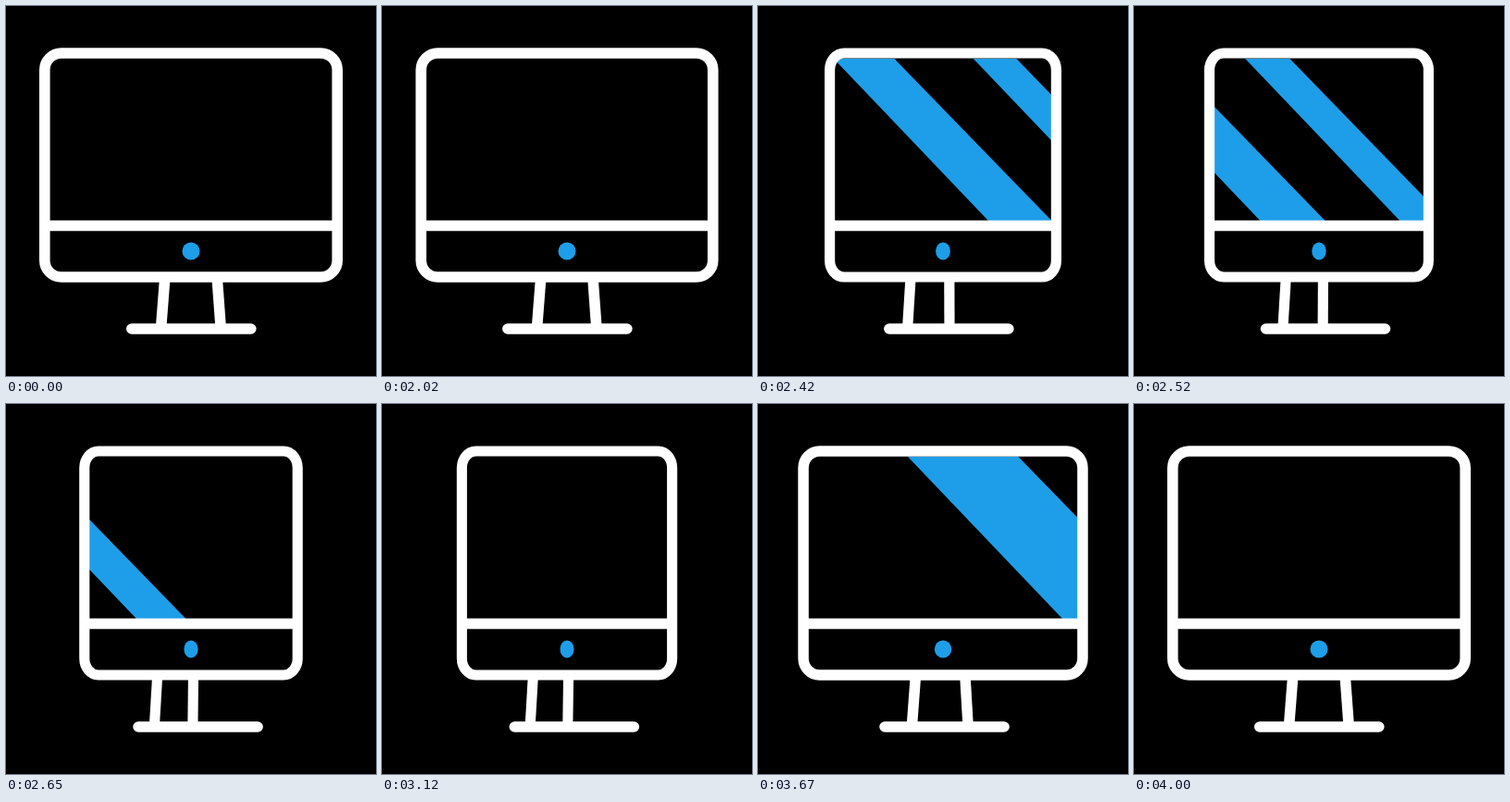
Animation, 400 px wide and 400 px high, one loop 4020 ms. Source, as an HTML page with a canvas:

```html
<!DOCTYPE html>
<html lang="en">
<head>
<meta charset="utf-8">
<title>Turning monitor</title>
<style>
  html, body { margin: 0; width: 100%; height: 100%; overflow: hidden; background: #000; }
  canvas { display: block; width: 400px; height: 400px; }
</style>
</head>
<body>
<canvas id="stage" width="400" height="400"></canvas>
<script>
const ctx = document.getElementById('stage').getContext('2d');
const LOOP = 4020, TURN = 2018, BACK = 3000, END = 4003;
const BLUE = '#1e9ee8', WHITE = '#fff';
const TOP = 57, BOTTOM = 232;

const easeOut = u => 1 - (1 - u) ** 3;
const easeInOut = u => u < .5 ? (2 * u) ** 2.75 / 2 : 1 - (2 - 2 * u) ** 2.75 / 2;

// 0 = facing front, 1 = fully turned
function turnAt(t) {
  if (t < TURN || t > END) return 0;
  if (t < BACK) return easeOut((t - TURN) / (BACK - TURN));
  return 1 - easeInOut((t - BACK) / (END - BACK));
}

function line(x1, y1, x2, y2, cap = 'butt') {
  ctx.lineCap = cap;
  ctx.beginPath();
  ctx.moveTo(x1, y1);
  ctx.lineTo(x2, y2);
  ctx.stroke();
}

// Slanted band given by its left and right x at the top
function band(left, right) {
  ctx.beginPath();
  ctx.moveTo(left, TOP);
  ctx.lineTo(right, TOP);
  ctx.lineTo(right + 170, BOTTOM);
  ctx.lineTo(left + 167, BOTTOM);
  ctx.fill();
}

function glare(t) {
  if (t > TURN && t < BACK) {
    const dt = t - 2420;
    band(83 - 1.126 * dt, 148.5 - 1.109 * dt);
    band(234 - 1.126 * dt, 280.5 - 1.109 * dt);
  } else if (t >= BACK && t < END) {
    const dt = t - 3420;
    band(-84 + .98 * dt, 49 + .926 * dt);
  }
}

function draw(t) {
  const e = turnAt(t);
  const half = 158.2 - 45 * e;
  const l = 200 - half, r = 200 + half;

  ctx.fillStyle = '#000';
  ctx.fillRect(0, 0, 400, 400);

  ctx.fillStyle = BLUE;
  ctx.save();
  ctx.beginPath();
  ctx.rect(l, 51, r - l, 186);
  ctx.clip();
  glare(t);
  ctx.restore();

  ctx.beginPath();
  ctx.ellipse(200, 265, 9.5 - 2 * e, 9.5, 0, 0, 2 * Math.PI);
  ctx.fill();

  ctx.strokeStyle = WHITE;
  ctx.lineWidth = 11.6 - .5 * e;
  line(171.7 - 8.5 * e, 295, 167.6 - 7.5 * e, 348);
  line(228.3 - 27 * e, 295, 232.2 - 31.7 * e, 348);

  ctx.lineWidth = 11.6;
  line(135.8 + 7.6 * e, 349, 264.8 + 7.6 * e, 349, 'round');
  line(l, 237.5, r, 237.5);

  ctx.lineWidth = 11.6 - .5 * e;
  ctx.beginPath();
  ctx.roundRect(l, 51, r - l, 242, { x: 18 - 3 * e, y: 18 });
  ctx.stroke();
}

function tick() {
  draw(performance.now() % LOOP);
  requestAnimationFrame(tick);
}
tick();
</script>
</body>
</html>
```
